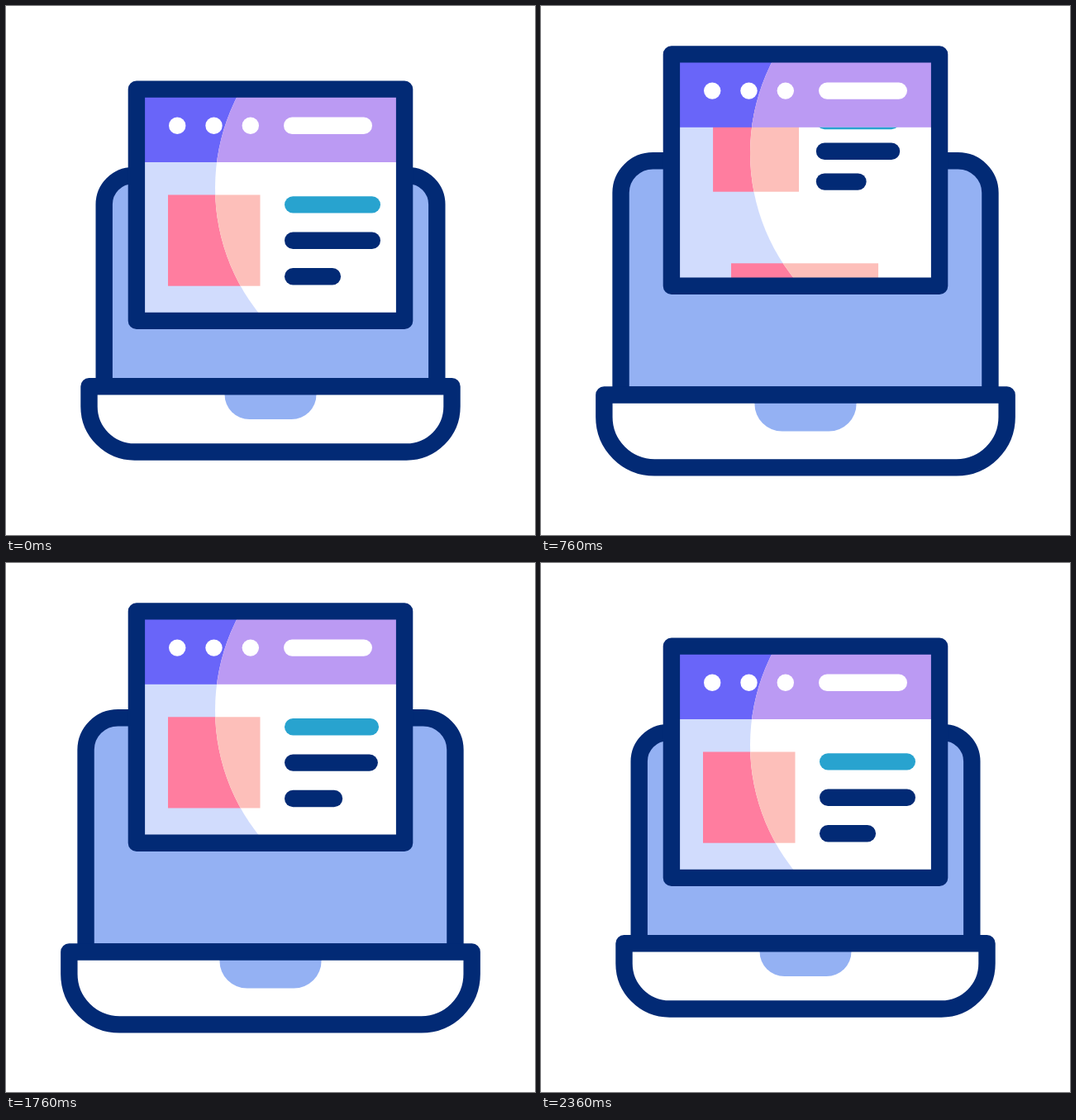
An HTML page with a canvas that plays this animation: 640x640 px, repeating every 2.4 s.

```html
<!DOCTYPE html>
<html lang="en">
<head>
<meta charset="utf-8">
<title>Laptop and web page</title>
<style>
  html, body { margin: 0; width: 100%; height: 100%; overflow: hidden; background: #fff; }
  canvas { display: block; width: 640px; height: 640px; }
</style>
</head>
<body>
<canvas id="stage" width="640" height="640"></canvas>
<script>
const ctx = document.getElementById('stage').getContext('2d');
const LOOP = 2400, STROKE = 20.4, MID_X = 320, MID_Y = 283.8;
const NAVY = '#022a75', BLUE = '#94b1f3', TEAL = '#28a3cf', WHITE = '#fff';
const SHADE = { head: '#6965f9', page: '#d1dcfd', block: '#ff7d9f' };
const LIGHT = { head: '#bb9af3', page: WHITE, block: '#fdbfba' };

const sine = p => (1 - Math.cos(Math.PI * p)) / 2;
const cubic = p => p < 0.5 ? 4 * p ** 3 : 1 - 4 * (1 - p) ** 3;
const ramp = (t, from, to, ease) =>
  ease(Math.min(1, Math.max(0, (t - from) / (to - from))));
// Rises from 0 to 1, holds, then falls back to 0.
const pulse = (t, a, b, c, d, ease) => ramp(t, a, b, ease) - ramp(t, c, d, ease);

function bar(x1, x2, y, color) {
  ctx.beginPath();
  ctx.moveTo(x1, y);
  ctx.lineTo(x2, y);
  ctx.strokeStyle = color;
  ctx.stroke();
}

function rect(x, y, w, h, color) {
  ctx.fillStyle = color;
  ctx.fillRect(x, y, w, h);
}

function centered(cx, cy, w, h, color) {
  rect(cx - w / 2, cy - h / 2, w, h, color);
}

function outlined(fill) {
  ctx.fillStyle = fill;
  ctx.fill();
  ctx.strokeStyle = NAVY;
  ctx.stroke();
}

function drawLaptop(grow) {
  const s = 1 + 0.11 * grow;
  const box = (half, top, bottom, radii) => {
    const y = 367.6 + (top - 367.6) * s;
    ctx.beginPath();
    ctx.roundRect(MID_X - half * s, y, 2 * half * s, (bottom - top) * s, radii.map(r => r * s));
  };
  box(201.3, 205.1, 460.3, [35, 35, 0, 0]);
  outlined(BLUE);
  box(219.5, 460.3, 539.5, [0, 0, 55, 55]);
  ctx.fillStyle = WHITE;
  ctx.fill();
  box(55.5, 460.3, 500, [0, 0, 30, 30]);
  ctx.fillStyle = BLUE;
  ctx.fill();
  box(219.5, 460.3, 539.5, [0, 0, 55, 55]);
  ctx.strokeStyle = NAVY;
  ctx.stroke();
}

function drawSurface(tone, scroll) {
  rect(160, 105, 320, 270, tone.page);
  const size = 1 - 0.177 * scroll;
  centered(MID_X - 68.25 * (1 - 0.318 * scroll), 283.6 - 178 * scroll,
    111.5 * size, 110.2 * size, tone.block);
  const s = 0.6 + 0.4 * scroll;
  centered(MID_X - 1.25 * s, MID_Y - 18.7 * s + 172 * (1 - scroll),
    236.5 * s, 59.6 * s, tone.block);
  rect(160, 105, 320, 84, tone.head);
}

function drawLines(scroll, swap) {
  ctx.save();
  ctx.beginPath();
  ctx.rect(160, 189, 320, 190);
  ctx.clip();
  const out = 1 - 0.4 * scroll, y = MID_Y - 172 * scroll;
  const line = (end, dy, color) =>
    bar(MID_X + 27.2 * out, MID_X + (end - MID_X) * out, y + dy * out, color);
  line(442.8 - 44 * swap, -43.4, TEAL);
  line(442.8 - 70.5 * swap, 0, NAVY);
  line(394.9 + 47 * swap, 43.4, NAVY);
  const s = 0.6 + 0.4 * scroll;
  bar(MID_X - 89.8 * s, MID_X + 89.8 * s, MID_Y + 55.4 * s + 172 * (1 - scroll), NAVY);
  ctx.restore();
}

function drawWindow(lift, scroll, swap) {
  ctx.save();
  ctx.translate(0, -42.2 * lift);
  ctx.save();
  ctx.beginPath();
  ctx.rect(160, 103, 320, 276);
  ctx.clip();
  drawSurface(SHADE, scroll);
  ctx.beginPath();
  ctx.arc(496.6, 220.2, 243.6, 0, Math.PI * 2);
  ctx.clip();
  drawSurface(LIGHT, scroll);
  ctx.restore();

  drawLines(scroll, swap);
  for (const x of [207.2, 251.5, 295.8]) bar(x, x + 0.01, 144.8, WHITE);
  bar(346.2, 432.8, 144.8, WHITE);
  ctx.strokeStyle = NAVY;
  ctx.strokeRect(157.9, 100.6, 324.2, 280.3);
  ctx.restore();
}

function draw(t) {
  ctx.lineWidth = STROKE;
  ctx.lineCap = ctx.lineJoin = 'round';
  rect(0, 0, 640, 640, WHITE);
  drawLaptop(pulse(t, 200, 645, 1960, 2360, sine));
  drawWindow(
    pulse(t, 200, 650, 1960, 2350, cubic),
    pulse(t, 570, 1020, 1425, 1745, sine),
    pulse(t, 1730, 1960, 1960, 2360, sine)
  );
}

const start = performance.now();
function tick() {
  draw((performance.now() - start) % LOOP);
  requestAnimationFrame(tick);
}
tick();
</script>
</body>
</html>
```
